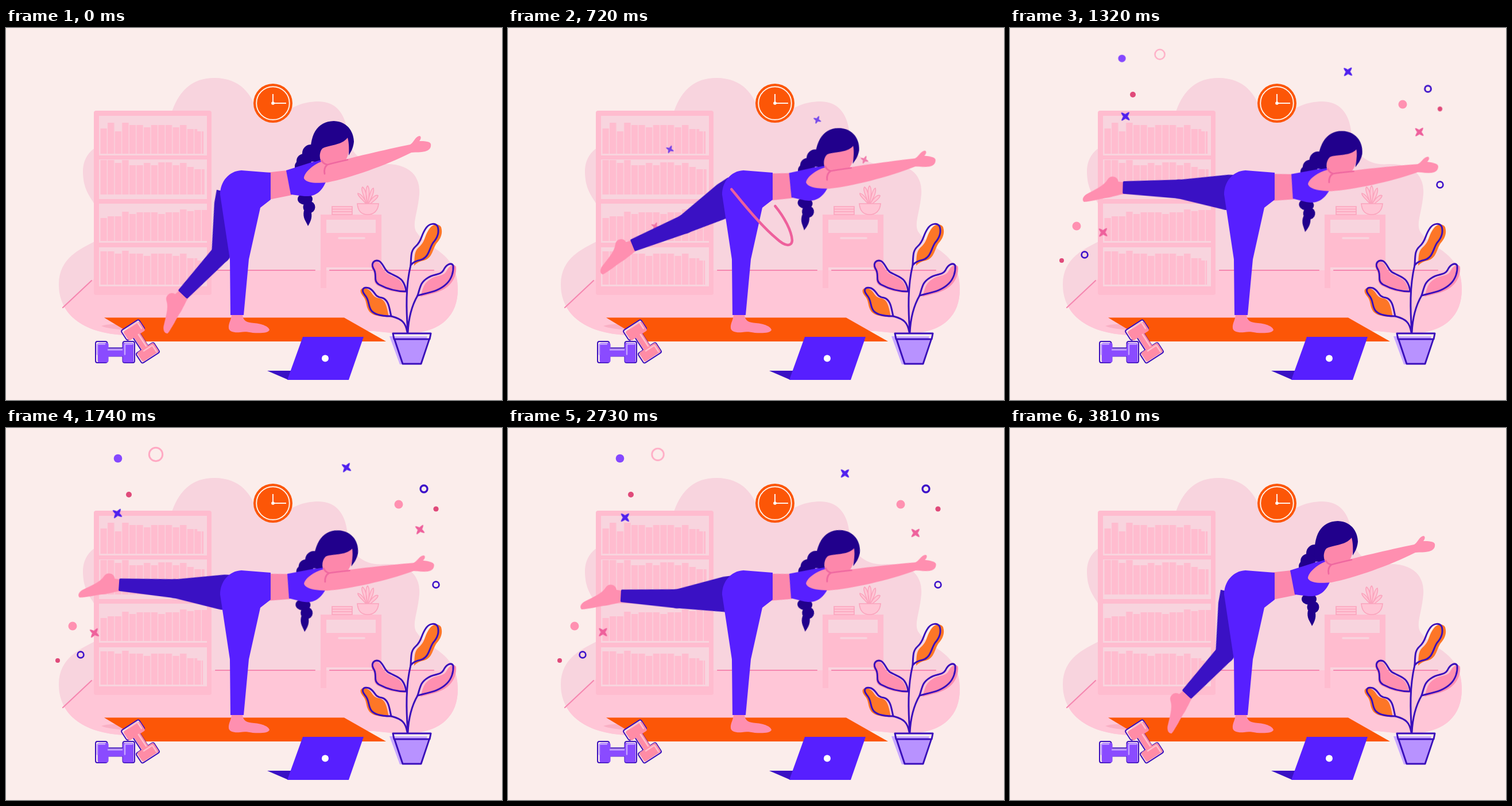
Write an HTML page without scripts that moves like this. It is 864 px wide and 648 px high and loops after 3840 ms.

```html
<!DOCTYPE html>
<html lang="en">
<head>
<meta charset="utf-8">
<title>Yoga at home</title>
<style>
  :root { --ink: #3a0fbb; --violet: #571fff; --shade: #3a11c4; --hair: #21008c; --skin: #ff8fb0; --blush: #ee609c; --shelf: #ffbccf; --wall: #f8d4de; --orange: #fc5607; }
  html, body { margin: 0; width: 100%; height: 100%; overflow: hidden; background: #fbedeb; }
  svg { display: block; width: 100vw; height: 100vh; }
  .move { animation: 3840ms linear infinite; }
  .line { fill: none; stroke: var(--ink); stroke-width: 3; stroke-linecap: round; stroke-linejoin: round; }

  .upper { transform-origin: 438px 268px; animation-name: lean; }
  @keyframes lean {
    0% { transform: rotate(0); animation-timing-function: cubic-bezier(.5,0,.8,.7); }
    12.5% { transform: rotate(1.8deg); animation-timing-function: cubic-bezier(.4,.2,.6,1); }
    25% { transform: rotate(7.6deg); animation-timing-function: ease-in-out; }
    45.3% { transform: rotate(6.8deg); }
    71.1% { transform: rotate(6.6deg); animation-timing-function: cubic-bezier(.4,0,.7,.8); }
    83.6% { transform: rotate(2deg); animation-timing-function: cubic-bezier(.3,.4,.6,1); }
    99.2%, 100% { transform: rotate(0); }
  }

  .braid { transform-origin: 525px 290px; animation-name: sway; }
  @keyframes sway {
    0%, 12.5%, 83.6%, 100% { transform: rotate(0); }
    25% { transform: rotate(6deg); animation-timing-function: ease-in-out; }
    45.3% { transform: rotate(-4deg); animation-timing-function: ease-in-out; }
    71.1% { transform: rotate(-1deg); }
  }

  .leg { transform-origin: 400px 290px; animation-name: lift; }
  @keyframes lift {
    0% { transform: rotate(-76deg); animation-timing-function: cubic-bezier(.5,0,.8,.6); }
    12.5% { transform: rotate(-58deg); }
    15.6% { transform: rotate(-47.6deg); animation-timing-function: cubic-bezier(.35,.25,.6,.95); }
    25% { transform: rotate(1.3deg); animation-timing-function: ease-out; }
    32% { transform: rotate(5deg); }
    45.3% { transform: rotate(5.5deg); animation-timing-function: ease-in; }
    71.1% { transform: rotate(-4deg); animation-timing-function: cubic-bezier(.35,.15,.7,.8); }
    83.6% { transform: rotate(-47.6deg); }
    86.7% { transform: rotate(-58deg); animation-timing-function: cubic-bezier(.2,.4,.5,1); }
    99.2%, 100% { transform: rotate(-76deg); }
  }

  .shin { transform-origin: 294px 290px; animation-name: bend; }
  @keyframes bend {
    0% { transform: rotate(29deg); animation-timing-function: ease-in; }
    12.5% { transform: rotate(19deg); }
    25% { transform: rotate(-5deg); animation-timing-function: ease-in-out; }
    45.3% { transform: rotate(-1.5deg); animation-timing-function: ease-in-out; }
    71.1% { transform: rotate(7deg); }
    83.6% { transform: rotate(20deg); animation-timing-function: ease-out; }
    99.2%, 100% { transform: rotate(29deg); }
  }

  .swoosh { animation-name: swoosh; }
  @keyframes swoosh {
    0%, 9% { stroke-dasharray: 0 200; stroke-dashoffset: 0; stroke-width: 0; }
    10% { stroke-width: 4.5; }
    12.5% { stroke-dasharray: 34 200; stroke-dashoffset: 0; }
    16.4% { stroke-dasharray: 77 200; stroke-dashoffset: -19; }
    25% { stroke-dasharray: 35 200; stroke-dashoffset: -65; }
    28% { stroke-width: 4.5; }
    28.9%, 71.2% { stroke-dasharray: 0 200; stroke-dashoffset: -100; stroke-width: 0; }
    72% { stroke-width: 4.5; }
    75% { stroke-dasharray: 35 200; stroke-dashoffset: -65; }
    83.6% { stroke-dasharray: 77 200; stroke-dashoffset: -19; }
    87.5% { stroke-dasharray: 34 200; stroke-dashoffset: 0; }
    90% { stroke-width: 4.5; }
    91%, 100% { stroke-dasharray: 0 200; stroke-dashoffset: 0; stroke-width: 0; }
  }

  .cross { animation-name: burst; }
  @keyframes burst {
    0%, 8%, 92%, 100% { transform: translate(0, 0) scale(0); opacity: .6; }
    12.5%, 87.5% { transform: translate(calc(var(--x) * .29), calc(var(--y) * .29)) scale(.2); opacity: .6; }
    16.2%, 83.6% { transform: translate(calc(var(--x) * .43), calc(var(--y) * .43)) scale(.55); opacity: .6; animation-timing-function: ease-out; }
    25% { transform: translate(calc(var(--x) * .92), calc(var(--y) * .92)) rotate(55deg); opacity: 1; animation-timing-function: ease-out; }
    45.3% { transform: translate(var(--x), var(--y)) rotate(35deg); opacity: 1; animation-timing-function: ease-in-out; }
    71.1% { transform: translate(calc(var(--x) * .96), calc(var(--y) * .96)) rotate(45deg); opacity: 1; animation-timing-function: ease-in; }
  }

  .dot { transform-box: fill-box; transform-origin: center; }
  .early { animation-name: early; }
  .middle { animation-name: middle; }
  .late { animation-name: late; }
  .hoop { animation-name: hoop; }
  @keyframes early {
    0%, 22%, 82%, 100% { transform: scale(0); }
    25% { transform: scale(.7); }
    28%, 73% { transform: scale(1); }
  }
  @keyframes middle {
    0%, 24%, 84%, 100% { transform: scale(0); }
    31%, 75% { transform: scale(1); }
  }
  @keyframes late {
    0%, 29%, 91%, 100% { transform: scale(0); }
    35%, 72% { transform: scale(1); }
    83.6% { transform: scale(1.1); }
  }
  @keyframes hoop {
    0%, 30%, 91%, 100% { transform: scale(0); }
    36%, 45.3% { transform: scale(1); }
    71.1% { transform: scale(.88); }
    83.6% { transform: scale(.8); }
  }
</style>
</head>
<body>
<svg viewBox="0 0 864 648">
  <defs>
    <pattern id="books" x="164.5" width="12.6" height="648" patternUnits="userSpaceOnUse">
      <rect width="11.3" height="648" fill="#ffbccf"/>
    </pattern>
    <path id="blob" d="M290 143C303 108 325 87 363 87C410 87 428 118 436 142C455 165 480 150 497 140C512 132 526 128 545 128C580 129 592 155 595 185C598 220 625 241 660 237C705 236 722 260 720 290C717 325 705 345 717 358C735 385 787 390 787 455C787 500 760 532 690 533L640 528L210 535C135 533 92 499 92 447C92 400 130 385 154 372C162 365 165 345 160 320C155 300 134 290 134 250C134 225 150 208 165 205C200 200 270 200 290 143Z"/>
    <clipPath id="room"><use href="#blob"/></clipPath>
    <path id="cross" d="M-8.500 0Q0-4 8.500 0Q0 4-8.500 0ZM0-8.500Q4 0 0 8.500Q-4 0 0-8.500Z" stroke-width="2.200" stroke-linejoin="round"/>
    <path id="weight" d="M-31-18.5H-17Q-13.500-18.500-13.500-15V-7H13.500V-15Q13.500-18.500 17-18.500H31Q34-18.500 34-15V15Q34 18.500 31 18.500H17Q13.500 18.500 13.500 15V7H-13.500V15Q-13.500 18.500-17 18.500H-31Q-34 18.500-34 15V-15Q-34-18.500-31-18.500Z"/>
    <path id="shine" d="M-30-14H-18M18-14H30M-12-4H12M-31-13V4M17-13V4" fill="none" stroke-width="2.500" stroke-linecap="round"/>
    <path id="leafTop" d="M705 413C706 395 705 388 714 380C725 370 722 362 732 348C738 340 748 339 752 346C755 356 752 365 744 374C737 384 737 400 722 404Q711 406 705 413Z"/>
    <path id="leafLeft" d="M697 459C680 459 665 455 650 447C638 440 648 430 640 419C635 409 642 403 650 406C657 410 658 419 665 425C675 431 685 433 690 440Q696 448 697 459Z"/>
    <path id="leafRight" d="M717 466C722 450 722 443 735 435C745 428 757 431 762 422C767 411 776 408 779 414C780 425 776 437 768 445C755 458 740 460 717 466Z"/>
    <path id="leafLow" d="M671 502C655 502 640 500 635 490C630 480 633 474 625 465C618 456 622 450 632 453C644 458 640 468 655 470C667 473 668 490 671 502Z"/>
  </defs>

  <!-- Room -->
  <use href="#blob" fill="#f8d4de"/>
  <path clip-path="url(#room)" fill="#ffc6d7" d="M50 532L150 440L170 422H800V560H50Z"/>
  <path d="M99 487L149 440M365 422H538M564 422H745" stroke="#f587b0" stroke-width="2.200" stroke-linecap="round"/>

  <!-- Bookcase -->
  <rect x="153" y="144" width="205" height="321" rx="4" fill="var(--shelf)"/>
  <path fill="var(--wall)" d="M162 153h188v69h-188zM162 229h188v69h-188zM162 306h188v68h-188zM162 382h188v68h-188z"/>
  <g fill="url(#books)">
    <path d="M164 219V175h12.600v-10h12.600v15h12.600v-15h12.600v4h25.200v4h12.600v-4h37.800v4h12.600v-4h12.600v7h18v4h11V219Z"/>
    <path d="M164 290V230h25.200v5h12.600v-5h12.600v9h25.200v-4h12.600v4h12.600v-5h25.200v5h12.600v-4h12.600v7h12.600v4h18V290Z"/>
    <path d="M164 371V331h12.600v-3h25.200v-8h12.600v4h12.600v-3h37.800v3h12.600v-3h25.200v-5h12.600v3h12.600v-2h23V371Z"/>
    <path d="M164 447V389h25.200v4h12.600v-5h12.600v5h25.200v4h12.600v-4h37.800v4h12.600v-4h12.600v8h18v4h10V447Z"/>
  </g>

  <!-- Cabinet -->
  <path fill="var(--shelf)" d="M548 325H654V430H644V417H558V453H548Z"/>
  <rect x="558" y="334" width="86" height="23" fill="var(--wall)"/>
  <path d="M580 366H624" stroke="var(--wall)" stroke-width="3.500" stroke-linecap="round"/>
  <g fill="#ffc5d5" stroke="#fba4bd" stroke-width="1.600">
    <path d="M568 311h35v14h-35zM568 315.500h35M568 320h35"/>
    <path d="M627 306C617 295 612 291 613 288C619 289 625 298 628 306C621 287 618 280 621 277C626 280 629 292 629 306C626 286 627 277 630 275C634 279 633 294 630 306C634 285 637 279 640 279C642 287 636 297 631 306C639 293 645 290 648 292C648 297 641 300 635 306"/>
    <path d="M612 306H649C648 319 640 325 630 325C620 325 613 319 612 306Z"/>
  </g>

  <!-- Clock -->
  <circle cx="465" cy="131" r="34" fill="var(--orange)"/>
  <g fill="none" stroke="#fff0e8" stroke-width="2">
    <circle cx="465" cy="131" r="28.800"/>
    <path d="M465 115V131H488"/>
  </g>
  <circle cx="465" cy="131" r="2.800" fill="#fff"/>

  <!-- Mat -->
  <path d="M166 519Q180 514 205 517L215 526Q180 525 166 519Z" fill="#f9b0c5"/>
  <path d="M171 504.500H589L662 546H240Z" fill="var(--orange)"/>

  <!-- Confetti -->
  <g transform="translate(441 324)">
    <g fill="#4f20ee" stroke="#4f20ee">
      <use class="move cross" href="#cross" style="--x:-247px;--y:-175px"/>
      <use class="move cross" href="#cross" style="--x:152px;--y:-255px"/>
    </g>
    <g fill="#ee609c" stroke="#ee609c">
      <use class="move cross" href="#cross" style="--x:-287px;--y:33px"/>
      <use class="move cross" href="#cross" style="--x:280px;--y:-147px"/>
    </g>
  </g>
  <g fill="#e04a7a">
    <circle class="move dot late" cx="749" cy="141" r="4.600"/>
    <circle class="move dot middle" cx="214" cy="116" r="5"/>
    <circle class="move dot early" cx="90" cy="405" r="4"/>
  </g>
  <g fill="#ff91b1">
    <circle class="move dot late" cx="195" cy="53" r="7.300" fill="#8548ff"/>
    <circle class="move dot middle" cx="684" cy="133" r="7.500"/>
    <circle class="move dot middle" cx="116" cy="345" r="7.500"/>
  </g>
  <g fill="none" stroke="#3d12c9" stroke-width="2.700">
    <circle class="move dot hoop" cx="261" cy="46" r="11.700" stroke="#ffa9c3" stroke-width="3"/>
    <circle class="move dot late" cx="728" cy="106" r="6" stroke-width="3.300"/>
    <circle class="move dot early" cx="749" cy="273" r="5.400"/>
    <circle class="move dot early" cx="130" cy="395" r="5.400"/>
  </g>

  <!-- Raised leg, laid out straight to the left -->
  <g class="move leg" fill="var(--shade)">
    <g class="move shin">
      <path fill="var(--skin)" d="M199 281L188 280C187 271 174 268 169 277C163 288 146 296 134 303C127 307 125 314 129 317C143 316 155 311 167 309C180 307 188 303 199 301Z"/>
      <path d="M198 279L294 273.500A16.500 16.500 0 0 1 294 306.500L198 301Q196 301 196 299V281Q196 279 198 279Z"/>
    </g>
    <path d="M400 256L377 257.500L294 273.500A16.500 16.500 0 0 0 294 306.500L377 319L400 318Z"/>
  </g>

  <!-- Upper body -->
  <g class="move upper">
    <path fill="#fc88ac" d="M453 252L490 248L498 291L453 300Z"/>
    <g fill="var(--hair)">
      <g class="move braid">
        <ellipse cx="521" cy="298" rx="13" ry="10"/>
        <circle cx="528" cy="312" r="10.500"/>
        <path d="M519 318C516 331 523 337 526 345C532 335 534 328 531 318Z"/>
      </g>
      <circle cx="531" cy="218" r="15"/>
      <circle cx="519" cy="232" r="13"/>
      <circle cx="514" cy="241" r="11"/>
    </g>
    <path fill="var(--violet)" d="M488 248L548 229L560 262C552 280 545 294 520 293L496 290Z"/>
    <path fill="#fd87ab" d="M548 208L598 186C601 208 596 224 590 233L556 241C547 236 545 224 548 208Z"/>
    <path fill="var(--hair)" d="M531 232C527 185 542 163 571 162C598 163 606 185 606 198C605 210 600 217 597 222C598 208 597 198 595 191C585 205 560 204 551 210C546 216 546 224 548 230L538 233Z"/>
    <path fill="var(--skin)" d="M549 233C535 238 519 252 519 262C525 272 545 270 560 269C600 261 660 240 706 217C715 216 722 217 730 215C738 213 741 208 740 202C738 197 728 197 720 197C724 192 723 188 720 188C712 190 710 200 704 203C660 212 600 226 565 236Z"/>
    <path d="M555 254Q553 243 560 238Q575 234 595 229.500M550 231Q553 237 560 238" fill="none" stroke="#ef68a0" stroke-width="2.800" stroke-linecap="round"/>
  </g>

  <!-- Standing leg -->
  <path fill="var(--skin)" d="M393 498H412C412 510 419 513 432 514C446 515 458 520 459 526C457 531 445 532 430 531C420 529 415 529 408 530C397 531 389 529 388 523C387 514 393 508 393 498Z"/>
  <path fill="var(--violet)" d="M461 252L410 248C388 249 373 268 373 290L390 403L391 500H414L423 403L443 313L461 299Z"/>

  <path class="move swoosh" pathLength="100" fill="none" stroke="var(--blush)" stroke-linecap="round" d="M377 213C362 205 350 206 352 218C356 238 378 268 396 289C425 325 450 352 468 367C482 380 494 382 495 370C494 352 478 323 459 303"/>

  <!-- Dumbbells -->
  <g stroke-linejoin="round">
    <g transform="translate(190 564.500)">
      <use href="#weight" fill="#fbedeb" stroke="#3a0fbb" stroke-width="2"/>
      <use href="#weight" transform="translate(1 1) scale(.92)" fill="#8a4bff"/>
      <use href="#shine" stroke="#c5a4ff"/>
    </g>
    <g transform="translate(234 546) rotate(57)">
      <use href="#weight" fill="#ffe1e6" stroke="#3a0fbb" stroke-width="2"/>
      <use href="#weight" transform="translate(1 -1) scale(.92)" fill="#ff8ca6"/>
      <use href="#shine" stroke="#ffc0cd"/>
    </g>
  </g>

  <!-- Laptop -->
  <path fill="var(--shade)" d="M455 597H498L492 613Z"/>
  <path fill="var(--violet)" d="M517 538H623L597 613H490Z"/>
  <circle cx="556" cy="575.500" r="6" fill="#fff"/>

  <!-- Potted plant -->
  <path fill="#c9a9ff" d="M668 537H734L719 586H686Z"/>
  <path fill="#b892ff" d="M677 543H735L722 584H692Z"/>
  <use href="#leafTop" x="6" y="1" fill="#fd7627"/>
  <use href="#leafLow" x="-4" y="1" fill="#fd7627"/>
  <use href="#leafLeft" x="-2" y="2" fill="#ff8fb0"/>
  <use href="#leafRight" x="5" y="2" fill="#ff8fb0"/>
  <g class="line">
    <use href="#leafTop"/>
    <use href="#leafLow"/>
    <use href="#leafLeft"/>
    <use href="#leafRight"/>
    <path d="M705 413C696 450 697 490 700 531M717 466C706 485 701 508 700 531M671 502C690 507 696 513 699 530"/>
    <path d="M674 532H740L738 542H676ZM677 543L691 585H723L737 543"/>
  </g>
</svg>
</body>
</html>
```
